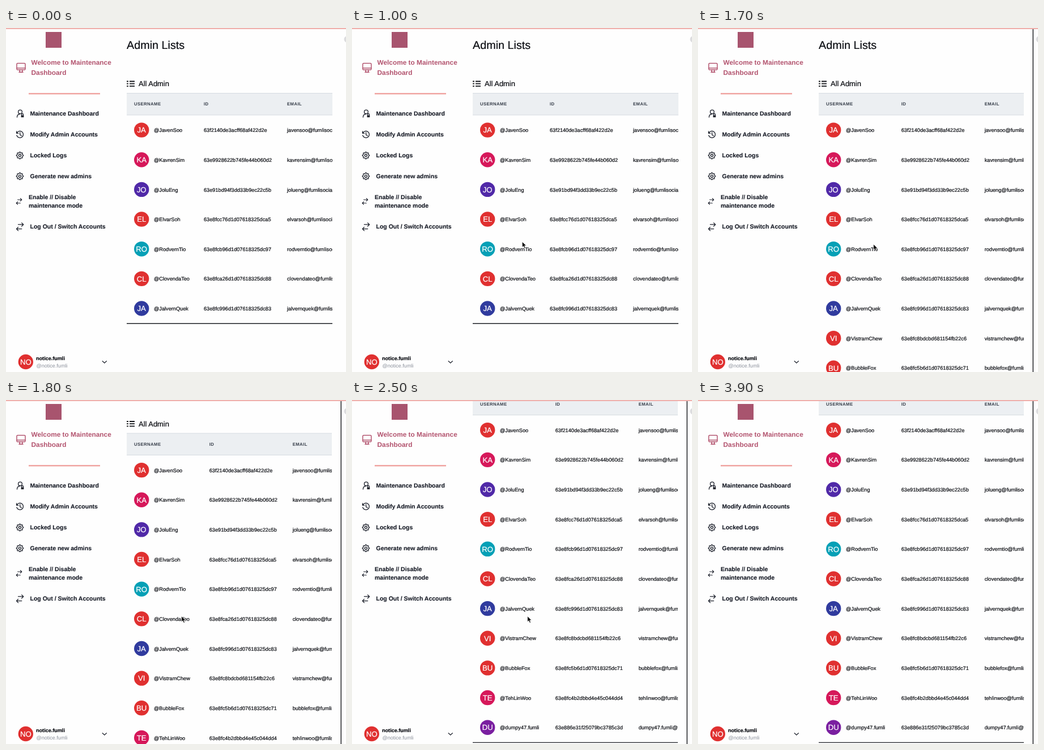
Recreate the animation shown at these times as an HTML page. Size 600x609 px, loop 4 s.

```html
<!DOCTYPE html>
<html lang="en">
<head>
<meta charset="utf-8">
<title>Admin Lists</title>
<style>
  html, body { margin: 0; width: 100%; height: 100%; overflow: hidden; background: #fefefe; }
  svg { display: block; font-family: "Liberation Sans", Arial, sans-serif; text-rendering: geometricPrecision; }
  text { fill: #0b0d12; stroke: #0b0d12; stroke-width: .22; white-space: pre; }
  .cell { font-size: 9.2px; }
  .head { font: bold 7.75px "Liberation Sans", Arial, sans-serif; letter-spacing: .05em; fill: #363d49; stroke: none; }
  .menu { font-weight: bold; font-size: 10.5px; fill: #161a25; stroke: #161a25; stroke-width: .12; }
  .welcome { font-weight: bold; font-size: 11.85px; fill: #b3546f; stroke: none; }
  .initials { font-size: 13.2px; fill: #fff; stroke: #fff; text-anchor: middle; }
  .muted { fill: #8b909b; stroke: none; }
  .icon { fill: none; stroke: #1b1f2a; stroke-width: 1.3; stroke-linecap: round; stroke-linejoin: round; }
</style>
</head>
<body>
<svg width="600" height="609" viewBox="0 0 600 609">
  <defs>
    <clipPath id="tableClip"><rect id="clipBox" x="213" y="0" width="363" height="900"/></clipPath>
    <path id="swap" d="M-4-5H8m0 0l-4-4m4 4l-4 4M4 5H-8m0 0l4 4m-4-4l4-4" vector-effect="non-scaling-stroke"/>
  </defs>

  <g id="page">
    <text x="213" y="37" font-size="19.8">Admin Lists</text>
    <path d="M213 94.5h3m2 0h9M213 98.7h3m2 0h9M213 102.9h3m2 0h9" stroke="#111319" stroke-width="1.8"/>
    <text x="234" y="103" font-size="12.95">All Admin</text>
    <g clip-path="url(#tableClip)">
      <rect x="213" y="115.5" width="363" height="38.5" fill="#eceff2"/>
      <path d="M213 115.5h363M213 154h363" stroke="#d6dbe1"/>
      <text class="head" x="226" y="137.3">USERNAME</text>
      <g id="columns">
        <text class="head" x="349" y="137.3">ID</text>
        <text class="head" x="496" y="137.3">EMAIL</text>
      </g>
      <g id="rows"></g>
      <path id="tableEnd" d="M213 523.2h363" stroke="#1c1f24" stroke-width="1.4"/>
    </g>
  </g>

  <rect x="70" y="7" width="28" height="28" fill="#a8546e"/>
  <g class="icon" style="stroke:#b3546f;stroke-width:1.5">
    <rect x="19" y="62.5" width="15" height="11.5" rx="1.5"/>
    <path d="M19 71h15M24.5 74l-.7 4h5.4l-.7-4M23 78.3h7"/>
  </g>
  <text class="welcome" x="44.5" y="65">Welcome to Maintenance</text>
  <text class="welcome" x="44.5" y="83.3">Dashboard</text>
  <path d="M40 116.3h126" stroke="#f0a5a2" stroke-width="2.5"/>

  <g id="menu"></g>
  <g class="icon">
    <circle cx="25" cy="148.5" r="3.4"/>
    <path d="M19.5 158c0-3.5 2-5.3 5-5.6M27.5 154.5v-1.3a1.5 1.5 0 0 1 3 0v1.3"/>
    <rect x="26.6" y="154.5" width="4.8" height="3.6" fill="#1b1f2a" stroke="none"/>
    <path d="M19.2 186a5.9 5.9 0 1 1-.3 4M18.6 183v3.4h3.3M24.7 185v4l2.6 1.6"/>
    <use href="#swap" transform="translate(23 307) scale(.6)" stroke-width="1.1"/>
    <use href="#swap" transform="translate(24.6 351.8) scale(.77)"/>
    <path d="M170.3 589.7l3.5 3.4 3.5-3.4"/>
  </g>
  <g class="icon" id="gears"></g>

  <circle cx="34.8" cy="591" r="13.2" fill="#e03030"/>
  <text class="initials" x="34.8" y="595.8">NO</text>
  <text x="53" y="587.6" font-size="9.1" font-weight="bold">notice.fumli</text>
  <text class="muted" x="53.5" y="600.8" font-size="9.05">@notice.fumli</text>

  <circle cx="602" cy="20" r="5.5" fill="#dcdcde"/>
  <path id="edge" d="M591.3 2V609" stroke="#15171b" stroke-width="1.4"/>
  <path d="M0 1h600" stroke="#efb0ac" stroke-width="2"/>
  <path id="cursor" d="M0 0v10l2.3-2.1 1.7 3.8 1.9-.8-1.7-3.7h3.2z" fill="#000" stroke="#fff" stroke-width=".8"/>
</svg>

<script>
const $ = id => document.getElementById(id);
const LOOP = 4000, STEP = 100, ROW = 52.65, SHORT = 7;
const RED = '#e03030', PINK = '#d6185a', PURPLE = '#5029a8';

const admins = [
  ['JavenSoo', '63f2140de3acff68af422d2e', RED],
  ['KavrenSim', '63e9928622b745fe44b060d2', PINK],
  ['JoluEng', '63e91bd94f3dd33b9ec22c5b', PURPLE],
  ['ElvarSoh', '63e8fcc76d1d07618325dca5', RED],
  ['RodvernTio', '63e8fcb96d1d07618325dc97', '#05a0b6'],
  ['ClovendaTeo', '63e8fca26d1d07618325dc88', RED],
  ['JalvernQuek', '63e8fc996d1d07618325dc83', '#303b9e'],
  ['VistramChew', '63e8fc8bdcbd681154fb22c6', RED],
  ['BubbleFox', '63e8fc5b6d1d07618325dc71', RED],
  ['TehLinWoo', '63e8fc4b2dbbd4e45c044dd4', PINK],
  ['dumpy47.fumli', '63e886e31f25079bc3785c3d', '#7a1fa0']
];

$('rows').innerHTML = admins.map(([name, id, color], i) => {
  const y = 180.6 + ROW * i;
  return `<g class="row">
    <circle cx="239.2" cy="${y}" r="13.2" fill="${color}"/>
    <text class="initials" x="239.2" y="${y + 4.8}">${name.slice(0, 2).toUpperCase()}</text>
    <text class="cell" x="261" y="${y + 3.6}">@${name}</text>
    <g class="shift">
      <text class="cell" x="349" y="${y + 3.6}">${id}</text>
      <text class="cell" x="496" y="${y + 3.6}">${name.toLowerCase()}@fumlisocial.com</text>
    </g></g>`;
}).join('');

$('menu').innerHTML = [
  [42.5, 155.2, 'Maintenance Dashboard'],
  [42.5, 192, 'Modify Admin Accounts'],
  [42.5, 229, 'Locked Logs'],
  [42.5, 265.8, 'Generate new admins'],
  [40, 302.6, 'Enable // Disable'],
  [40, 318.4, 'maintenance mode'],
  [42.5, 355.2, 'Log Out / Switch Accounts']
].map(([x, y, label]) => `<text class="menu" x="${x}" y="${y}">${label}</text>`).join('');

function gear(cx, cy) {
  const points = Array.from({ length: 64 }, (_, i) => {
    const a = i * Math.PI / 32, r = 5.4 + .8 * Math.cos(8 * a);
    return `${(cx + r * Math.cos(a)).toFixed(2)},${(cy + r * Math.sin(a)).toFixed(2)}`;
  });
  return `<polygon points="${points.join(' ')}"/><circle cx="${cx}" cy="${cy}" r="2.1"/>`;
}
$('gears').innerHTML = gear(24.5, 225.6) + gear(24.5, 262.4);

const rows = document.querySelectorAll('.row');
const shifted = [$('columns'), ...document.querySelectorAll('.shift')];
const move = (el, x, y) => el.setAttribute('transform', `translate(${x} ${y})`);
const show = (el, on) => el.setAttribute('visibility', on ? 'visible' : 'hidden');

function draw(t) {
  const full = t >= 1500;
  const scroll = t < 1800 ? 0 : t < 1900 ? 56.5 : 127.4;
  const glide = Math.min(1, Math.max(0, (t - 1200) / 300));

  move($('page'), 0, -scroll);
  rows.forEach((row, i) => show(row, full || i < SHORT));
  shifted.forEach(el => move(el, full ? 9.7 : 0, 0));
  move($('tableEnd'), 0, full ? ROW * (admins.length - SHORT) : 0);
  $('clipBox').setAttribute('width', full ? 362 : 363);
  show($('edge'), full);
  show($('cursor'), t >= 900 && t < 2700);
  move($('cursor'), 300.3 + 9.3 * glide, 378.3 + 4.5 * glide);
}

function tick(now) {
  draw(Math.floor(now % LOOP / STEP) * STEP);
  requestAnimationFrame(tick);
}
tick(performance.now());
</script>
</body>
</html>
```
